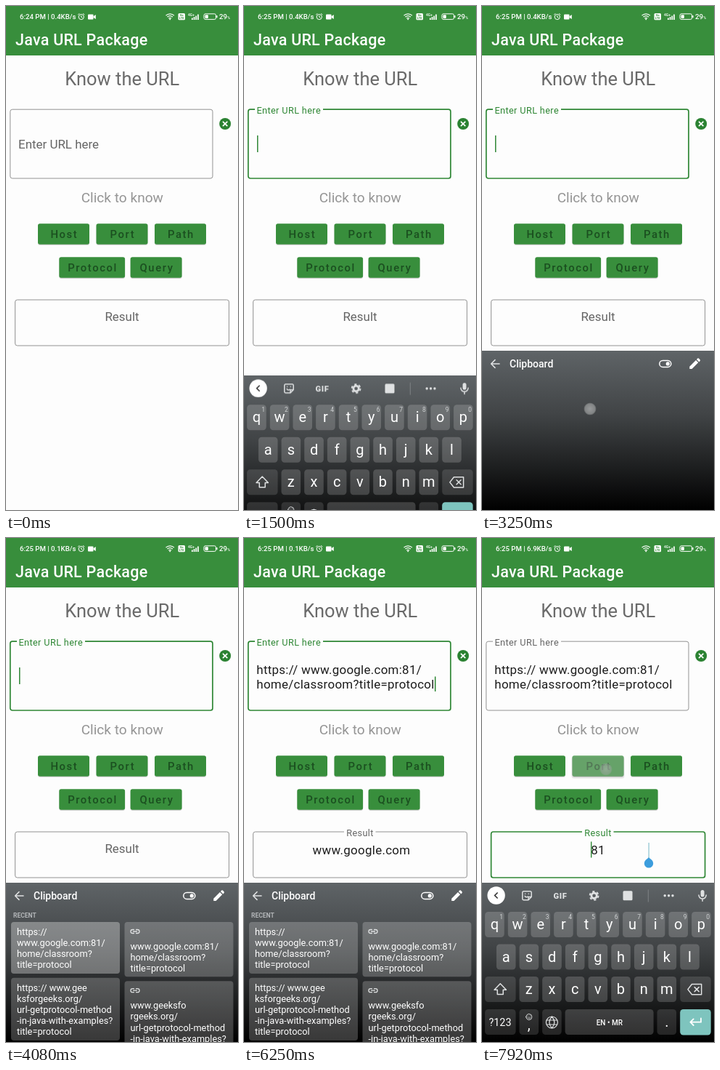
These frames come from a looping animation (320x693 px, 8000 ms). An HTML page:

```html
<!DOCTYPE html>
<html lang="en">
<head>
<meta charset="utf-8">
<title>Java URL Package</title>
<style>
html, body { margin: 0; width: 100%; height: 100%; overflow: hidden; background: #fdfdfd; }
svg { display: block; width: 100%; height: 100%; }
text { font-family: Roboto, "Liberation Sans", sans-serif; white-space: pre; }
.mid { text-anchor: middle; }
.status { font-size: 9.6px; font-weight: 500; fill: #fff; }
.btn rect { fill: #388e3c; }
.btn text { font-size: 14.84px; font-weight: 500; letter-spacing: 1.6px; fill: #1b4f20; }
.btn .shade { fill: #000; opacity: .16; }
.entry { font-size: 16.95px; letter-spacing: .28px; fill: #1c1c1c; }
.box { fill: none; stroke: #929292; stroke-width: 1; }
.label { font-size: 16.95px; fill: #656565; }
.caret { fill: #2f8735; }
.line { fill: none; stroke: #dfe1e2; stroke-width: 1.5; stroke-linecap: round; stroke-linejoin: round; }
.solid { fill: #dfe1e2; }
.key { font-size: 20px; fill: #fff; text-anchor: middle; }
.hint { font-size: 8.5px; fill: #d0d3d4; text-anchor: middle; }
.clip { font-size: 12.8px; fill: #fff; }
.menu { font-size: 10.5px; fill: #eceded; text-anchor: middle; }

/* 8 s loop: 1% = 80 ms */
.a { animation: 8s step-end infinite; }
.f { animation-timing-function: linear; }
#st0 { animation-name: st0; } #st1 { animation-name: st1; }
#st2 { animation-name: st2; } #st3 { animation-name: st3; }
@keyframes st0 { 0% { opacity: 1 } 6.25%, 100% { opacity: 0 } }
@keyframes st1 { 0% { opacity: 0 } 6.25% { opacity: 1 } 42.75%, 100% { opacity: 0 } }
@keyframes st2 { 0% { opacity: 0 } 42.75% { opacity: 1 } 95.85%, 100% { opacity: 0 } }
@keyframes st3 { 0% { opacity: 0 } 95.85%, 100% { opacity: 1 } }

#box1 { animation-name: box1; } #box2 { animation-name: box2; }
@keyframes box1 {
  0% { stroke: #929292; stroke-width: 1px }
  13.5% { stroke: #2f8735; stroke-width: 1.7px }
  82.2%, 100% { stroke: #929292; stroke-width: 1px }
}
@keyframes box2 {
  0% { stroke: #929292; stroke-width: 1px }
  82.2%, 100% { stroke: #2f8735; stroke-width: 1.7px }
}
#gap1 { animation-name: gap1; } #gap2 { animation-name: gap2; }
@keyframes gap1 { 0% { opacity: 0 } 13.5%, 100% { opacity: 1 } }
@keyframes gap2 { 0% { opacity: 0 } 70.6%, 100% { opacity: 1 } }
#label1 { animation-name: label1; } #label2 { animation-name: label2; }
@keyframes label1 {
  0%, 13.4% { transform: translate(17px, 196px); font-size: 16.95px; letter-spacing: 0; fill: #656565 }
  13.5% { fill: #2f8735 }
  15.6%, 100% { transform: translate(17.5px, 148px); font-size: 12.7px; letter-spacing: .38px }
  82.1% { fill: #2f8735 }
  82.2%, 100% { fill: #656565 }
}
@keyframes label2 {
  0%, 70.6% { transform: translate(160px, 433px); font-size: 16.95px; letter-spacing: 0 }
  72.7%, 100% { transform: translate(160px, 409.7px); font-size: 12.7px; letter-spacing: .38px }
  0%, 82.1% { fill: #656565 }
  82.2%, 100% { fill: #2f8735 }
}
#typed { animation-name: typed; }
@keyframes typed { 0% { opacity: 0 } 53.1%, 100% { opacity: 1 } }
#caret1 { animation-name: caret1; } #caret2 { animation-name: caret2; }
#caret3 { animation-name: caret3; } #caret4, #stem, #port81 { animation-name: late; }
@keyframes caret1 {
  0%, 19.75%, 32.25%, 44.75%, 53.1%, 100% { opacity: 0 }
  13.5%, 26%, 38.5%, 51% { opacity: 1 }
}
@keyframes caret2 {
  0%, 59.4%, 71.9%, 82.2%, 100% { opacity: 0 }
  53.1%, 65.6%, 78.1% { opacity: 1 }
}
@keyframes caret3 {
  0%, 88.7%, 97.4%, 100% { opacity: 0 }
  82.2%, 95% { opacity: 1 }
}
@keyframes late { 0% { opacity: 0 } 97.4%, 100% { opacity: 1 } }
#host { animation-name: host; }
@keyframes host { 0% { opacity: 0 } 70.6% { opacity: 1 } 97.4%, 100% { opacity: 0 } }
#handle { animation-name: handle; }
@keyframes handle {
  0% { opacity: 0; transform: none }
  82.2% { opacity: 1; transform: none }
  97.4%, 100% { opacity: .85; transform: translateY(1px) }
}
#hitHost { animation-name: hitHost; } #hitPort { animation-name: hitPort; }
@keyframes hitHost { 0%, 68.7% { opacity: 0 } 69.8%, 71.5% { opacity: 1 } 74.5%, 100% { opacity: 0 } }
@keyframes hitPort { 0%, 96.8% { opacity: 0 } 98%, 100% { opacity: 1 } }

#board { animation-name: board; }
@keyframes board {
  0%, 14.6% { transform: translateY(219px) }
  15.6% { transform: translateY(185px) }
  16.6% { transform: translateY(112px) }
  17.75% { transform: translateY(63px) }
  18.75% { transform: translateY(34.5px) }
  19.75% { transform: translateY(14px) }
  20.9% { transform: translateY(3px) }
  21.9%, 100% { transform: none }
}
#bar { animation-name: bar; } #keys { animation-name: keys; }
#menu { animation-name: menu; } #clips { animation-name: clips; }
#cards { animation-name: cards; } #hitCard { animation-name: hitCard; }
@keyframes bar { 0% { opacity: 1 } 39.6% { opacity: 0 } 82.2%, 100% { opacity: 1 } }
@keyframes keys { 0% { opacity: 1 } 31.25% { opacity: 0 } 82.2%, 100% { opacity: 1 } }
@keyframes menu { 0% { opacity: 0 } 31.25% { opacity: 1 } 39.6%, 100% { opacity: 0 } }
@keyframes clips { 0% { opacity: 0 } 39.6% { opacity: 1 } 82.2%, 100% { opacity: 0 } }
@keyframes cards { 0%, 41.5% { opacity: 0 } 43.6%, 100% { opacity: 1 } }
@keyframes hitCard { 0%, 47.8% { opacity: 0 } 49%, 55% { opacity: .14 } 57.3%, 100% { opacity: 0 } }
#ripple { animation-name: ripple; }
@keyframes ripple { 0%, 27% { opacity: 0; r: 12px } 28.6%, 30% { opacity: .14; r: 23px } 31.8%, 100% { opacity: 0; r: 23px } }
#touch { animation-name: touch; }
@keyframes touch {
  0% { opacity: 0; transform: translate(140px, 192px) }
  12.5% { opacity: 1; transform: translate(140px, 192px) }
  14.6% { opacity: 0 }
  27% { opacity: 1; transform: translate(250px, 483px) }
  30.2% { opacity: 0 }
  37.5% { opacity: 1; transform: translate(149px, 554px) }
  41.6% { opacity: 0 }
  47.9% { opacity: 1; transform: translate(85px, 563px) }
  50% { opacity: 0 }
  68.8% { opacity: 1; transform: translate(82px, 318px) }
  70.8% { opacity: 0 }
  80.3% { opacity: 1; transform: translate(225px, 432px) }
  82.2% { opacity: 0 }
  96.9%, 100% { opacity: .7; transform: translate(171px, 318px) }
}
</style>
</head>
<body>
<svg viewBox="0 0 320 693">
  <defs>
    <linearGradient id="dusk" x1="0" y1="0" x2="0" y2="1">
      <stop offset="0" stop-color="#5f6467"/>
      <stop offset=".4" stop-color="#414446"/>
      <stop offset="1" stop-color="#000"/>
    </linearGradient>
    <radialGradient id="dot">
      <stop offset="0" stop-color="#b4b6b6" stop-opacity=".75"/>
      <stop offset=".8" stop-color="#a4a6a6" stop-opacity=".65"/>
      <stop offset="1" stop-color="#a4a6a6" stop-opacity=".2"/>
    </radialGradient>
  </defs>
  <rect width="320" height="693" fill="#fdfdfd"/>
  <rect width="320" height="68" fill="#388e3c"/>

  <g class="status">
    <text id="st0" class="a" x="19" y="18">6:24 PM | 0.4KB/s</text>
    <text id="st1" class="a" x="19" y="18">6:25 PM | 0.4KB/s</text>
    <text id="st2" class="a" x="19" y="18">6:25 PM | 0.1KB/s</text>
    <text id="st3" class="a" x="19" y="18">6:25 PM | 6.9KB/s</text>
    <text x="294" y="18" font-size="9.8">29<tspan font-size="5.5">%</tspan></text>
    <text x="251" y="14" font-size="5">4G+</text>
  </g>
  <g fill="none" stroke="#fff">
    <circle cx="103.8" cy="15" r="3.6"/>
    <path d="M103.8 13v2.2l1.6 1M99.3 12.2l2-2M108.3 12.2l-2-2"/>
    <path d="M220.5 13.2a8 8 0 0 1 11.4 0M222.4 15.2a5.2 5.2 0 0 1 7.6 0M224.3 17.1a2.6 2.6 0 0 1 3.8 0" stroke-width="1.2"/>
    <rect x="273" y="10.8" width="16.5" height="7.6" rx="2"/>
  </g>
  <g fill="#fff">
    <rect x="113" y="11.5" width="7.5" height="7" rx="1"/>
    <path d="M120.5 14.3l3.3-2.2v5.8l-3.3-2.2zM290.3 13h1.3v3.2h-1.3z"/>
    <circle cx="226.2" cy="18.3" r="1"/>
    <rect x="237.5" y="10" width="9.5" height="9.2" rx="1.5"/>
    <rect x="274.5" y="12.3" width="4.4" height="4.6" rx=".8"/>
    <path d="M256 16.5h1.7v2.5H256zM258.7 15h1.7v4h-1.7zM261.4 13.5h1.7v5.5h-1.7zM264.1 11.5h1.7V19h-1.7z"/>
  </g>
  <g fill="#388e3c" font-size="4.2" font-weight="700" class="mid">
    <text x="242.2" y="14.3">Vo</text><text x="242.2" y="18.3">LTE</text>
  </g>
  <text x="13" y="54.3" font-size="21.5" font-weight="500" letter-spacing=".25" fill="#fff">Java URL Package</text>

  <text class="mid" x="160.3" y="109" font-size="25.5" fill="#6a6a6a">Know the URL</text>

  <rect id="box1" class="box a" x="5.8" y="142.2" width="279.2" height="94.8" rx="3"/>
  <rect id="gap1" class="a" x="15" y="140" width="94" height="5" fill="#fdfdfd"/>
  <text id="label1" class="label a f">Enter URL here</text>
  <g id="typed" class="entry a">
    <text x="17.3" y="187">https:// www.google.com:81/</text>
    <text x="17.3" y="206.5">home/classroom?title=protocol</text>
  </g>
  <rect id="caret1" class="caret a" x="18" y="178" width="1.5" height="23"/>
  <rect id="caret2" class="caret a" x="263" y="190.5" width="1.5" height="20.5"/>
  <circle cx="302.2" cy="162" r="8" fill="#2b8232"/>
  <path d="M299 158.8l6.4 6.4M305.4 158.8l-6.4 6.4" stroke="#fff" stroke-width="1.7"/>

  <text class="mid" x="160.3" y="270" font-size="19.1" fill="#959595">Click to know</text>
  <g id="buttons"></g>

  <rect id="box2" class="box a" x="12.6" y="404" width="295" height="63" rx="3"/>
  <rect id="gap2" class="a" x="138" y="401.5" width="43.5" height="5" fill="#fdfdfd"/>
  <text id="label2" class="label mid a f">Result</text>
  <text id="host" class="entry mid a" x="162" y="435">www.google.com</text>
  <text id="port81" class="entry mid a" x="160" y="435">81</text>
  <rect id="stem" class="a" x="229.4" y="419" width="1.4" height="21" fill="#9ccbd6"/>
  <rect id="caret3" class="caret a" x="229.4" y="417.5" width="1.4" height="21"/>
  <rect id="caret4" class="caret a" x="150" y="417.5" width="1.4" height="22"/>
  <path id="handle" class="a" d="M230 438.2l4.2 3.6a6.2 6.2 0 1 1-8.4 0z" fill="#1a8cd8"/>

  <g id="board" class="a f">
    <rect y="474" width="320" height="219" fill="url(#dusk)"/>
    <g id="bar" class="a">
      <circle id="ripple" class="a f" cx="257" cy="491.5" r="23" fill="#fff"/>
      <circle cx="19.6" cy="491.5" r="12.2" fill="#fff"/>
      <path d="M21.6 487.5l-4 4 4 4" fill="none" stroke="#333" stroke-width="1.6"/>
      <path class="line" d="M57.5 485.8h9a1.7 1.7 0 0 1 1.7 1.7v6l-4.2 4.2h-6.5a1.7 1.7 0 0 1-1.7-1.7v-8.5a1.7 1.7 0 0 1 1.7-1.7zM68 493.5h-4v4M59.2 492.3q1.6 2.5 4 .8M59.6 489.2v.1M64.3 489.2v.1"/>
      <text class="mid solid" x="108" y="495.7" font-size="11.2" font-weight="800" letter-spacing=".6">GIF</text>
      <circle class="line" cx="154.6" cy="491.8" r="3.7" stroke-width="2.8" style="stroke-width:2.8"/>
      <circle class="line" cx="154.6" cy="491.8" r="5.9" style="stroke-width:2;stroke-linecap:butt" stroke-dasharray="3.1 3.08"/>
      <rect class="solid" x="194.5" y="485.3" width="13" height="13" rx="1.5"/>
      <path d="M229.3 483.5v17" stroke="#7f8385"/>
      <g class="solid">
        <circle cx="252.2" cy="491.8" r="1.7"/><circle cx="257.6" cy="491.8" r="1.7"/><circle cx="263" cy="491.8" r="1.7"/>
        <rect x="301.6" y="484" width="5" height="9.4" rx="2.5"/>
      </g>
      <path class="line" d="M299 491a5.1 5.1 0 0 0 10.2 0M304.1 496.3v3"/>
    </g>
    <g id="keys" class="a"></g>
    <g id="menu" class="a"></g>
    <g id="clips" class="a">
      <path class="line" d="M24 492H12.7M18 486.6l-5.4 5.4 5.4 5.4"/>
      <text x="38" y="497.2" font-size="14" font-weight="500" fill="#fff">Clipboard</text>
      <rect class="line" x="244.8" y="487.4" width="16" height="9" rx="4.5" style="stroke:#fff"/>
      <circle cx="256.3" cy="491.9" r="2.6" fill="#fff"/>
      <path d="M286.3 499v-3.3l8.7-8.7 3.3 3.3-8.7 8.7zM296 486l1.4-1.4q.8-.6 1.6 0l1.8 1.8q.6.8 0 1.6l-1.4 1.4z" fill="#fff"/>
      <g id="cards" class="a f">
        <text x="10" y="522" font-size="8.5" font-weight="600" fill="#b3b6b8">RECENT</text>
      </g>
    </g>
  </g>
  <circle id="touch" class="a" r="8.6" fill="url(#dot)"/>
</svg>
<script>
const $ = id => document.getElementById(id);
function add(parent, tag, attrs, text) {
  const node = document.createElementNS("http://www.w3.org/2000/svg", tag);
  for (const k in attrs) node.setAttribute(k, attrs[k]);
  if (text) node.textContent = text;
  return parent.appendChild(node);
}
const rect = (p, x, y, width, height, rx, more) => add(p, "rect", { x, y, width, height, rx, ...more });

// action buttons
function button(name, x, y, w) {
  const g = add($("buttons"), "g", { class: "btn" });
  rect(g, x, y + 1, w, 28.8, 3, { class: "shade" });
  rect(g, x, y, w, 28.6, 2.8);
  add(g, "text", { class: "mid", x: x + w / 2 + .9, y: y + 20.2 }, name);
  if (name === "Host" || name === "Port") {
    const hit = add(g, "g", { id: "hit" + name, class: "a f" });
    rect(hit, x - 1, y + 1.5, w + 2, 30, 3.5, { style: "fill:#000", opacity: .08 });
    rect(hit, x, y, w, 28.6, 2.8, { style: "fill:#fff", opacity: .25 });
  }
}
button("Host", 44, 299.2, 71);
button("Port", 124.5, 299.2, 71);
button("Path", 205, 299.2, 71);
button("Protocol", 73.3, 345.2, 90.8);
button("Query", 171.6, 345.2, 71);

// keyboard
const keys = $("keys"), pitch = 31.67;
const cap = (cx, y, w, light = .18) =>
  rect(keys, cx - w / 2, y, w, 35, 4.5, { fill: "#fff", "fill-opacity": light });
function row(letters, x, y, digits) {
  [...letters].forEach((c, i) => {
    const cx = x + i * pitch;
    cap(cx, y, 26.6);
    add(keys, "text", { class: "key", x: cx, y: y + 24 }, c);
    if (digits) add(keys, "text", { class: "hint", x: cx + 9.3, y: y + 10 }, String((i + 1) % 10));
  });
}
row("qwertyuiop", 17.4, 514, true);
row("asdfghjkl", 33.2, 558.5);
row("zxcvbnm", 64.8, 603);
[[25.3, 603, 42.5], [294.5, 603, 42.5], [25.3, 648, 42.5], [64.8, 648, 26.6], [96.4, 648, 26.6], [254.8, 648, 26.6]]
  .forEach(([x, y, w]) => cap(x, y, w, .13));
cap(175.6, 648, 122);
rect(keys, 273.2, 648, 42.5, 35.5, 4.5, { fill: "#7ec4be" });
const line = (d, more) => add(keys, "path", { class: "line", d, ...more });
line("M25.2 612.8l-8.2 8.4h4.2v6.2h8v-6.2h4.2z");
line("M289.5 613.5h13.2v14.2h-13.2l-5.6-7.1zM293.2 617.6l6 6M299.2 617.6l-6 6");
line("M302 660.5v5.2h-14.5M291.7 661.4l-4.3 4.3 4.3 4.3", { style: "stroke:#fff;stroke-width:1.8" });
line("M88.4 666a8 8 0 0 1 16 0a8 8 0 0 1-16 0zM96.4 658q-7 8 0 16q7-8 0-16M89.2 663h14.4M89.2 669h14.4", { style: "stroke-width:1.2" });
line("M60.8 658.5a4 4 0 0 1 8 0a4 4 0 0 1-8 0zM63 659.7q1.8 1.7 3.6 0M63.4 657.3v.1M66.2 657.3v.1", { style: "stroke-width:1" });
add(keys, "text", { class: "key", x: 64.8, y: 676 }, ",");
add(keys, "text", { class: "key", x: 254.8, y: 672 }, ".");
add(keys, "text", { class: "key", x: 25, y: 671, style: "font-size:14.3px" }, "?123");
add(keys, "text", { class: "key", x: 175.8, y: 669.5, style: "font-size:10px;font-weight:500" }, "EN • MR");

// tool menu
const tools = ["Theme", "Clipboard", "One-handed", "Text editing", "Floating", "Resize"];
tools.forEach((name, i) => {
  const x = 53 + (i % 3) * 107, y = 548 + (i > 2) * 76;
  rect($("menu"), x - 7, y - 8, 14, 16, 2, { class: "line" });
  add($("menu"), "path", { class: "line", d: `M${x - 3} ${y - 3}h6M${x - 3} ${y + 2}h6` });
  add($("menu"), "text", { class: "menu", x, y: y + 25 }, name);
});

// clipboard cards
const cards = $("cards");
function card(x, y, h, linked, lines) {
  rect(cards, x, y, 150, h, 4, { fill: "#fff", "fill-opacity": .22 });
  if (linked) add(cards, "path", {
    class: "line", style: "stroke-width:1.3",
    d: `M${x + 13} ${y + 10.5}h-2a2.5 2.5 0 0 0 0 5h2M${x + 16} ${y + 10.5}h2a2.5 2.5 0 0 1 0 5h-2M${x + 12} ${y + 13}h5`
  });
  const top = y + (linked ? 38 : 17.8);
  lines.forEach((s, i) => add(cards, "text", { class: "clip", x: x + 8, y: top + i * 15.2 }, s));
}
const course = ["home/classroom?", "title=protocol"];
const guide = ["url-getprotocol-method", "-in-java-with-examples?"];
card(7, 528, 71, false, ["https://", "www.google.com:81/", ...course]);
card(163.5, 528, 75.3, true, ["www.google.com:81/", ...course]);
card(7, 604.8, 86.3, false, ["https:// www.gee", "ksforgeeks.org/", ...guide, "title=protocol"]);
card(163.5, 609.2, 92, true, ["www.geeksfo", "rgeeks.org/", ...guide]);
rect(cards, 7, 528, 150, 71, 4, { id: "hitCard", class: "a f", fill: "#fff" });
</script>
</body>
</html>
```
